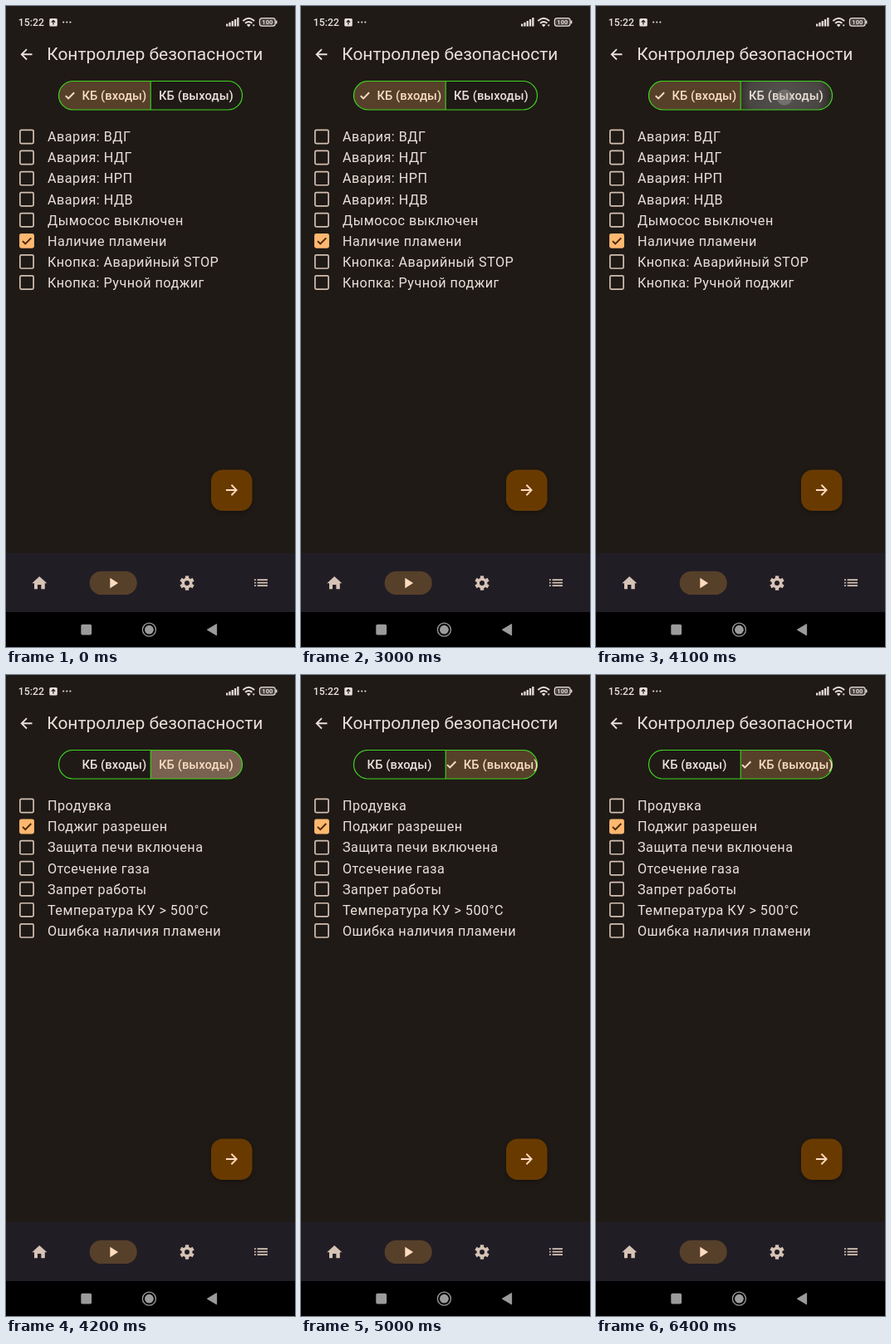
An HTML page for the animation above (8000 ms loop, 348 by 772 pixels).

```html
<!DOCTYPE html>
<html lang="ru">
<head>
<meta charset="utf-8">
<style>
html, body { margin: 0; width: 100%; height: 100%; overflow: hidden; background: #1f1a16; }
svg { display: block; width: 348px; height: 772px; font-family: Roboto, sans-serif; }
.row text { font-size: 16.2px; letter-spacing: .48px; fill: #ebe0d9; }
.label { font-size: 14.7px; font-weight: 500; letter-spacing: .1px; }
.line { fill: none; stroke-width: 2; }
</style>
</head>
<body>
<svg viewBox="0 0 348 772">
  <defs>
    <clipPath id="pill"><rect x="63.5" y="90.5" width="221" height="34.5" rx="17.25"/></clipPath>
    <clipPath id="right"><rect x="174" y="90" width="111" height="36"/></clipPath>
    <radialGradient id="glow">
      <stop offset="0" stop-color="#fff" stop-opacity=".24"/>
      <stop offset=".65" stop-color="#fff" stop-opacity=".19"/>
      <stop offset="1" stop-color="#fff" stop-opacity="0"/>
    </radialGradient>
    <filter id="soft" x="-30%" y="-30%" width="160%" height="160%"><feGaussianBlur stdDeviation="2.5"/></filter>
    <path id="tick" class="line" d="M-5 .3L-1.7 3.6L5.3-3.5" stroke-width="1.7"/>
    <path id="arrow" class="line" d="M-7 0H6.5M0-6.7L6.7 0L0 6.7"/>
  </defs>
  <rect width="348" height="772" fill="#1f1a16"/>

  <!-- status bar -->
  <g fill="#e6dfda">
    <text x="14.7" y="24.2" font-size="12.3" font-weight="500">15:22</text>
    <rect x="52.3" y="15" width="9.5" height="9.5" rx="1.5"/>
    <path d="M57 22.5V17.8M54.8 19.6L57 17.3L59.2 19.6" class="line" stroke="#1f1a16" style="stroke-width:1.2"/>
    <circle cx="69.2" cy="19.5" r="1.1"/><circle cx="73.3" cy="19.5" r="1.1"/><circle cx="77.4" cy="19.5" r="1.1"/>
    <path d="M265 21.5h2.3v3H265zM268.3 19.8h2.3v4.7h-2.3zM271.6 18h2.3v6.5h-2.3zM274.9 16h2.3v8.5h-2.3zM278.2 14h2.3v10.5h-2.3z"/>
    <g class="line" stroke="#e6dfda">
      <path d="M285.3 18Q292.2 11.6 299.1 18M288 20.8Q292.2 17 296.4 20.8" style="stroke-width:1.9"/>
      <rect x="305.4" y="14.6" width="18.8" height="9.6" rx="3" fill="#47423f" style="stroke-width:1.2"/>
    </g>
    <path d="M289.8 22.8Q292.2 20.8 294.6 22.8L292.2 25.2zM296.6 22.4h3.2L298.2 24.8zM325 17.5h1.4v3.8H325z"/>
    <text x="314.8" y="22.2" font-size="7.5" font-weight="700" text-anchor="middle">100</text>
  </g>

  <use href="#arrow" transform="translate(25 58.3) rotate(180) scale(.93)" stroke="#ebe0d9"/>
  <text x="49.2" y="65.3" font-size="20.98" fill="#ebe0d9">Контроллер безопасности</text>

  <!-- segmented button -->
  <g clip-path="url(#pill)">
    <rect id="selected" y="90" width="111" height="36" fill="#57402a"/>
    <g clip-path="url(#right)">
      <rect id="wash" x="174" y="90" width="111" height="36" fill="#a48d7e"/>
      <circle id="ripple" cx="227" cy="108" fill="url(#glow)"/>
    </g>
  </g>
  <path d="M174.2 90.5V125" stroke="#3fd31f" stroke-width="1.1"/>
  <rect x="63.5" y="90.5" width="221" height="34.5" rx="17.25" fill="none" stroke="#3fd31f" stroke-width="1.2"/>
  <text id="inputs" class="label" y="112.9">КБ (входы)</text>
  <text id="outputs" class="label" y="112.9">КБ (выходы)</text>
  <use id="check" href="#tick" stroke="#f8dcc3"/>
  <circle id="touch" cx="227" cy="110" r="9.5" fill="#aaa6a2" opacity=".38"/>

  <g id="listA"></g>
  <g id="listB"></g>

  <!-- floating button -->
  <rect x="247" y="560" width="49.5" height="50" rx="14" fill="#000" opacity=".3" filter="url(#soft)"/>
  <rect x="247" y="558.5" width="49.5" height="49.5" rx="14" fill="#693a00"/>
  <use href="#arrow" transform="translate(271.4 583) scale(.93)" stroke="#ffdcbf"/>

  <!-- navigation -->
  <rect y="659" width="348" height="71" fill="#211d25"/>
  <rect x="100.7" y="680.7" width="57" height="28.4" rx="14.2" fill="#57402a"/>
  <g fill="#d6c3b5">
    <path d="M38 702.3V697h4.4v5.3h4.4v-7.1h2.6L40.2 687L31.3 695.2H34v7.1z"/>
    <path d="M125.3 688.7V701.2L135.1 695z" fill="#ffdcbf"/>
    <g transform="translate(218 695)">
      <circle r="6.4"/>
      <g id="teeth" stroke="#d6c3b5" stroke-width="4.3"></g>
      <circle r="3" fill="#211d25"/>
    </g>
    <path d="M299 691.2h1.8M299 694.7h1.8M299 698.2h1.8M302.6 691.2h12.4M302.6 694.7h12.4M302.6 698.2h12.4" stroke="#d6c3b5" stroke-width="1.77"/>
  </g>
  <rect y="730" width="348" height="42" fill="#000"/>
  <g fill="#9b9b9b">
    <rect x="90.3" y="744.8" width="12.8" height="12.8" rx="1.8"/>
    <circle cx="172.4" cy="751.2" r="5.4"/>
    <circle cx="172.4" cy="751.2" r="8" fill="none" stroke="#9b9b9b" stroke-width="1.3"/>
    <path d="M242.3 751.2L253.6 744.5V757.9z" stroke="#9b9b9b" stroke-linejoin="round"/>
  </g>
</svg>
<script>
const $ = id => document.getElementById(id);
const set = (id, attrs) => { for (const k in attrs) $(id).setAttribute(k, attrs[k]); };
const clamp = v => Math.min(1, Math.max(0, v));
const ease = p => p * p * (3 - 2 * p);

function fillList(id, names, checked) {
  $(id).innerHTML = names.map((name, i) => {
    const on = i === checked;
    const paint = on ? 'fill="#ffb870" stroke="#ffb870"' : 'fill="none" stroke="#d3c0b2"';
    return `<g class="row" transform="translate(0 ${157.5 + i * 25.07})">
      <rect x="16.9" y="-8.1" width="16.2" height="16.2" rx="1.6" stroke-width="1.7" ${paint}/>
      ${on ? '<use href="#tick" x="25" stroke="#4a2800"/>' : ''}
      <text x="50" y="5.8">${name}</text></g>`;
  }).join('');
}

fillList('listA', ['Авария: ВДГ', 'Авария: НДГ', 'Авария: НРП', 'Авария: НДВ', 'Дымосос выключен',
  'Наличие пламени', 'Кнопка: Аварийный STOP', 'Кнопка: Ручной поджиг'], 5);
fillList('listB', ['Продувка', 'Поджиг разрешен', 'Защита печи включена', 'Отсечение газа',
  'Запрет работы', 'Температура КУ &gt; 500°C', 'Ошибка наличия пламени'], 1);
$('teeth').innerHTML = [0, 60, 120].map(a => `<path d="M0-8.7V8.7" transform="rotate(${a})"/>`).join('');

const PRESS = 3800, SWITCH = 4200;

function draw(t) {
  const done = t >= SWITCH;
  const pressed = t >= PRESS && !done;
  const shift = 11.8 * ease(clamp((t - SWITCH) / 350));
  const grow = done ? ease(clamp((t - SWITCH - 50) / 350)) : 1;
  set('listA', { display: done ? 'none' : 'inline' });
  set('listB', { display: done ? 'inline' : 'none' });
  set('selected', { x: done ? 174 : 63 });
  set('inputs', { x: 91.4 - shift, fill: done ? '#ebe0d9' : '#f8dcc3' });
  set('outputs', { x: 184 + shift, fill: done ? '#f8dcc3' : '#ebe0d9' });
  set('check', { transform: `translate(${done ? 181 : 76.8} 107.8) scale(${grow})`, opacity: grow });
  set('touch', { display: pressed ? 'inline' : 'none' });
  set('ripple', { r: pressed ? 18 + 47 * clamp((t - PRESS) / 300) : 0 });
  set('wash', { opacity: done ? .45 * (1 - clamp((t - SWITCH - 150) / 650)) : 0 });
}

const start = performance.now();
function frame() {
  draw((performance.now() - start) % 8000);
  requestAnimationFrame(frame);
}
frame();
</script>
</body>
</html>
```
